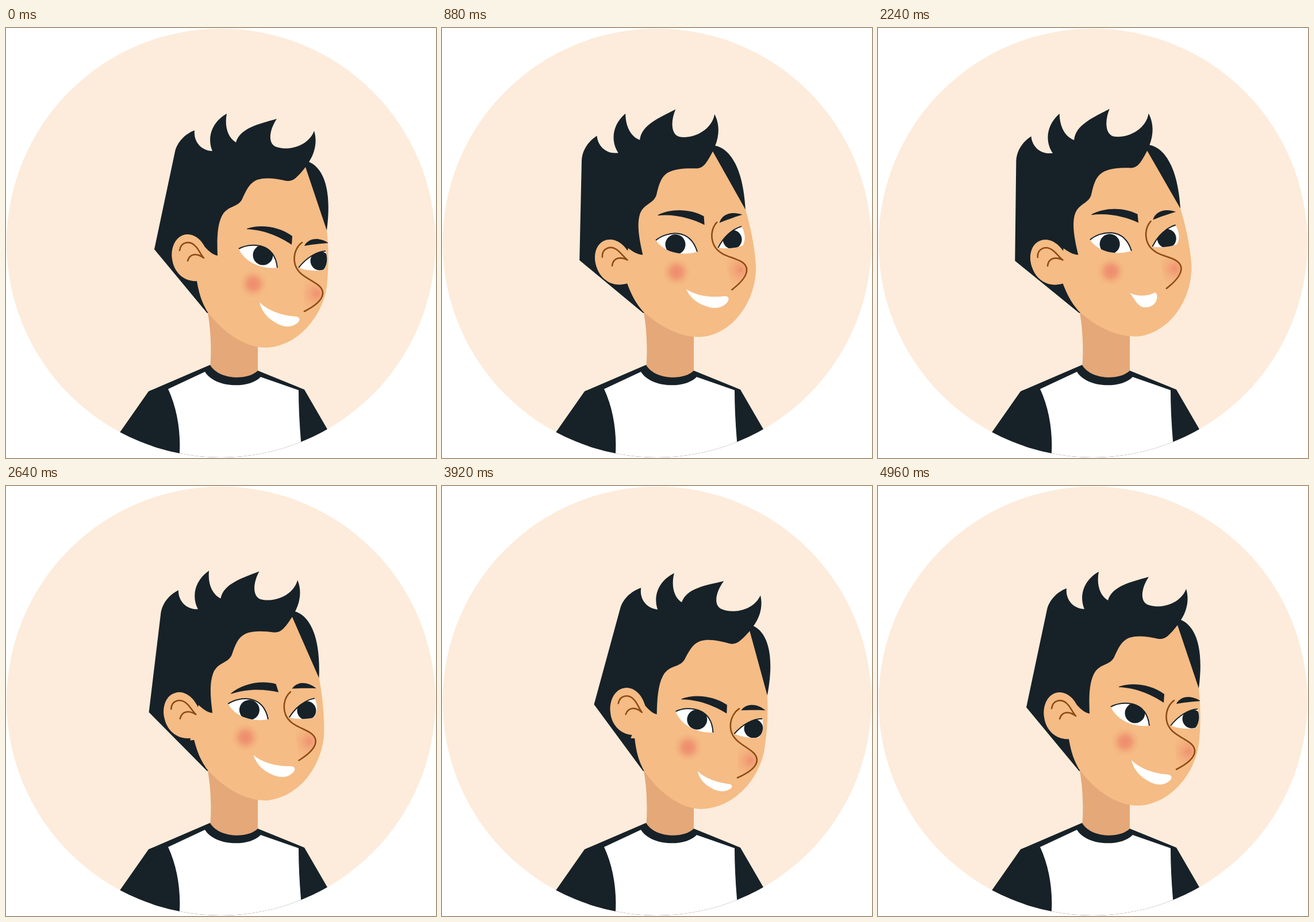
Animation, 748 px wide and 748 px high, one loop 5.04 s. Source, as an HTML page:

```html
<!DOCTYPE html>
<html lang="en">
<head>
<meta charset="utf-8">
<title>Avatar</title>
<style>
  html, body { margin: 0; height: 100%; overflow: hidden; background: #fff; }
  svg { display: block; width: 100vw; height: 100vh; }
  .dark { fill: #172128; }
  .skin { fill: #f5bc85; }
  .white { fill: #fff; }
  .line { fill: none; stroke: #8c4c14; stroke-width: 2.6; stroke-linecap: round; stroke-linejoin: round; }
  .lid { fill: none; stroke: #172128; stroke-width: 2; }
</style>
</head>
<body>
<svg viewBox="0 0 748 748">
  <defs>
    <radialGradient id="blush">
      <stop offset="0" stop-color="#ee8a6b"/>
      <stop offset=".4" stop-color="#ee8f6e" stop-opacity=".8"/>
      <stop offset="1" stop-color="#f3ad7c" stop-opacity="0"/>
    </radialGradient>
    <radialGradient id="noseBlush" gradientUnits="userSpaceOnUse" cx="540" cy="462" r="32">
      <stop offset="0" stop-color="#ee8a6b" stop-opacity=".85"/>
      <stop offset="1" stop-color="#f3ad7c" stop-opacity="0"/>
    </radialGradient>
    <clipPath id="disc"><circle cx="374" cy="374" r="373"/></clipPath>
    <clipPath id="leftEyeClip"><path class="leftEye"/></clipPath>
    <clipPath id="rightEyeClip"><path class="rightEye"/></clipPath>
  </defs>

  <circle cx="374" cy="374" r="373" fill="#fdecdb"/>
  <path fill="#e5a878" d="M350 490C356 520 358 560 355 592L400 616 438 600V500Z"/>
  <g clip-path="url(#disc)">
    <path class="dark" d="M355 586L248 632 150 772H602L519 629 438 596C420 614 370 612 355 586Z"/>
    <path class="white" d="M346 598L282 628C297 660 304 700 302 738V760H514L513 718Q509 670 509 630L443 607C425 627 365 628 346 598Z"/>
  </g>

  <g id="head">
    <path class="dark" d="M258 385L294 215C298 198 312 184 328 178C326 196 338 213 359 214C350 193 356 165 384 149C380 170 385 190 400 199
      C407 174 440 167 471 158C460 174 454 198 468 206C490 215 526 206 536 179C541 195 539 214 527 233
      C545 240 569 268 558 352L450 440 350 496Z"/>
    <path class="skin" d="M521 242C505 262 499 267 488 266C470 262 452 259 437 264C424 269 418 282 412 295C405 314 385 307 375 328
      C367 345 367 370 368 396C358 394 351 386 345 380L325 440H332C337 470 344 482 350 493C376 528 414 556 452 556
      C506 554 550 504 558 450C562 415 561 380 558 352Z"/>
    <g id="ear">
      <path class="skin" d="M350 391C342 366 326 358 314 359C295 361 286 382 289 402C292 426 311 443 336 440L356 420Z"/>
      <path class="line" d="M302 387C304 372 320 368 331 381C336 387 340 396 344 400C332 391 320 392 316 405"/>
    </g>
    <g id="face">
      <circle cx="430" cy="445" r="25" fill="url(#blush)"/>
      <path class="leftEye white"/>
      <g clip-path="url(#leftEyeClip)"><circle class="pupil dark" cx="447" cy="395" r="17.5"/></g>
      <path class="lid" id="leftLid"/>
      <path class="rightEye white"/>
      <g clip-path="url(#rightEyeClip)"><circle class="pupil dark" cx="546" cy="405" r="16.5"/></g>
      <path class="lid" id="rightLid"/>
      <path id="leftBrow" class="dark" d="M419 349C442 341 475 345 498 362L497 377C478 364 450 351 419 350Z"/>
      <path id="rightBrow" class="dark" d="M519 379C525 367 542 362 561 374C545 375 530 377 519 379Z"/>
      <path fill="url(#noseBlush)" d="M515 373C503 382 499 398 503 412C511 438 549 440 551 460C552 474 535 485 519 493Z"/>
      <path class="line" d="M515 373C503 382 499 398 503 412C511 438 549 440 551 460C552 474 535 485 519 493"/>
      <path id="mouth" class="white"/>
    </g>
  </g>
</svg>
<script>
const LOOP = 5040, STEP = 80;

// time, tilt, face x y, left brow x y turn, right brow y, pupil x y, ear x y, talk, smirk
const poses = [
  [0, 0, 0, 0, 0, 0, 0, 0, 0, 0, 0, 0, 0, 0],
  [880, -10.7, -10, -8.5, -3, -5.5, 3, -5, -10, 2.5, -4, 0, 0, 0],
  [1300, -11.4, -12, -10, -3, -7.5, 3, -8, -10, 3, -4, 0, 1, 0],
  [2160, -11.6, -12, -10, -3, -7.5, 3, -8, -10, 3, -4, 0, 1, 0],
  [2640, -5.1, -8.5, -1.5, -6, 6, -16, -7, -6, 3, -5, -4, 0, 0],
  [3360, 4.8, -5.5, 4, -11, 15.5, -18, 2, -4, 4, -4, -7, 0, 1],
  [3920, 3.3, -4.5, 5, -4.5, 9, -5, -2, -4, 1, -2, -6, 0, .75],
  [4900, 0, 0, 0, 0, 0, 0, 0, 0, 0, 0, 0, 0, 0]
];

const smile = 'M441 477C455 491 478 500 505 502C512 503 512 509 507 513C496 523 480 520 468 512C452 503 444 490 441 477Z';
const talking = 'M456 489C465 497 483 500 495 496C500 494 500 502 499 505C495 520 480 520 472 517C464 513 462 500 456 489Z';

const $ = id => document.getElementById(id);
const move = (id, value) => $(id).setAttribute('transform', value);
const setAll = (selector, name, value) =>
  document.querySelectorAll(selector).forEach(el => el.setAttribute(name, value));

function slope(i, c) {
  const a = poses[i], b = poses[i + 1];
  return a && b ? (b[c] - a[c]) / (b[0] - a[0]) : 0;
}

function tangent(i, c) {
  const a = slope(i - 1, c), b = slope(i, c);
  return a * b > 0 ? 2 * a * b / (a + b) : 0;
}

// Smooth interpolation that never overshoots a pose
function poseAt(time) {
  const t = Math.min(time, 4900);
  const i = Math.max(0, poses.findIndex(p => p[0] >= t) - 1);
  const a = poses[i], b = poses[i + 1], span = b[0] - a[0], u = (t - a[0]) / span;
  const ease = u * u * (3 - 2 * u);
  return a.slice(1).map((from, k) => {
    const c = k + 1;
    return from + (b[c] - from) * ease
      + span * u * (1 - u) * (tangent(i, c) * (1 - u) - tangent(i + 1, c) * u);
  });
}

function morph(from, to, k) {
  const target = to.match(/\d+/g);
  let n = 0;
  return from.replace(/\d+/g, v => +v + (target[n++] - v) * k);
}

function draw(t) {
  const [tilt, fx, fy, bx, by, turn, rightY, px, py, ex, ey, talk, smirk] = poseAt(t);
  const lid = Math.max(0, 1 - Math.abs(t - 3360) / 160);

  move('head', `rotate(${tilt} 350 495)`);
  move('ear', `translate(${ex} ${ey})`);
  move('face', `translate(${fx} ${fy})`);
  move('leftBrow', `translate(${bx} ${by}) rotate(${turn} 459 360)`);
  move('rightBrow', `translate(0 ${rightY}) rotate(${-.7 * turn} 540 372)`);
  setAll('.pupil', 'transform', `translate(${px} ${py})`);

  const leftLid = `M405 ${384 + 5 * lid}C425 ${373 + 11 * lid} 467 ${372 + 11 * lid} 472 417`;
  const rightLid = `M509 417C522 ${400 + 8 * lid} 540 ${389 + 11 * lid} 556 ${388 + 10 * lid}`;
  $('leftLid').setAttribute('d', leftLid);
  $('rightLid').setAttribute('d', rightLid);
  setAll('.leftEye', 'd', `${leftLid}C445 420 415 408 405 ${384 + 5 * lid}Z`);
  setAll('.rightEye', 'd', `${rightLid}C560 402 559 412 552 421C538 424 520 421 509 417Z`);

  $('mouth').setAttribute('d', morph(smile, talking, talk));
  move('mouth', `translate(508 ${508 + 2 * smirk}) scale(${1 - .16 * smirk} ${1 - .3 * smirk}) translate(-508 -508)`);
}

function tick() {
  draw(Math.floor(performance.now() % LOOP / STEP) * STEP);
  requestAnimationFrame(tick);
}
tick();
</script>
</body>
</html>
```
